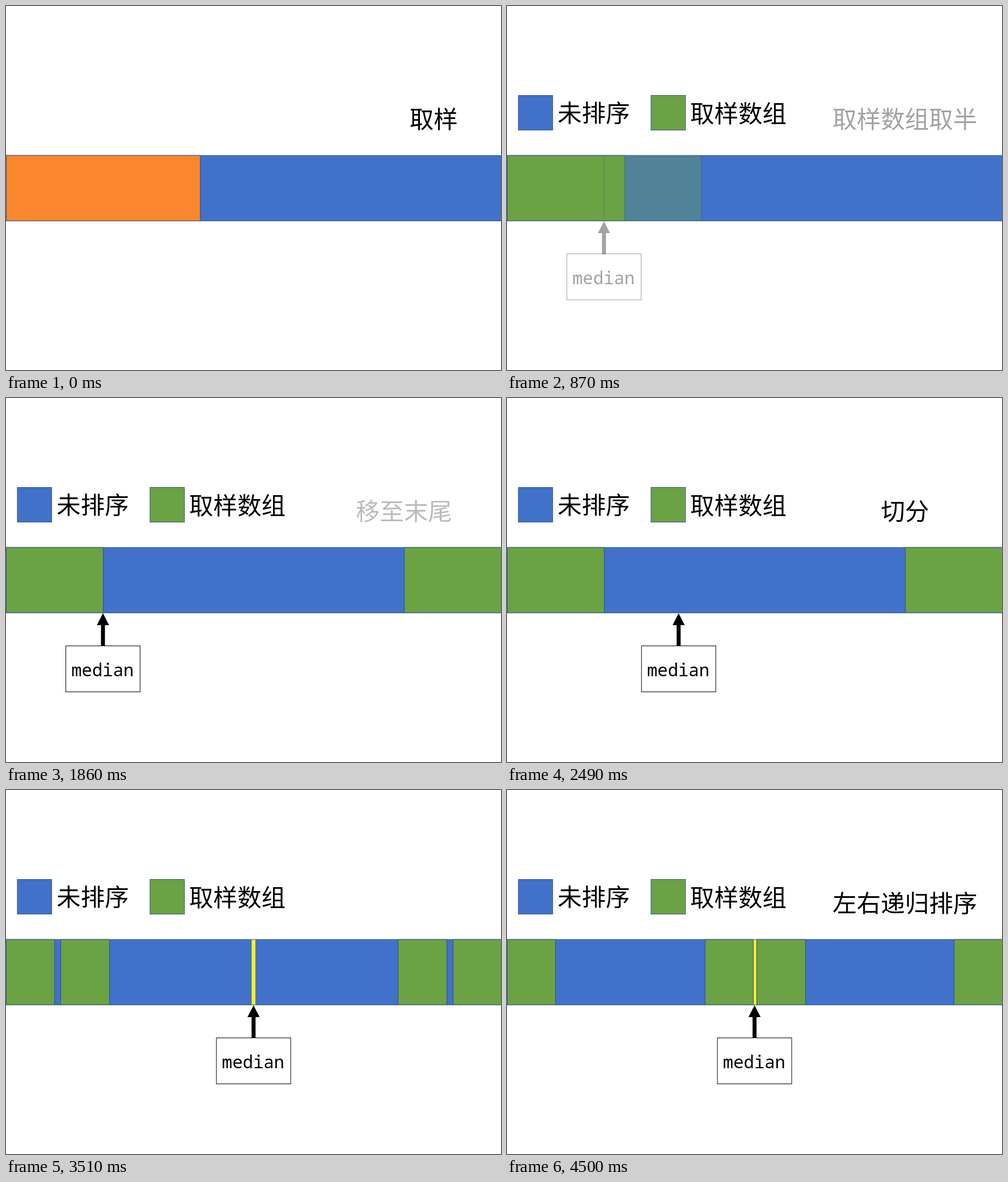
Animation, 873 px wide and 641 px high, one loop 4620 ms. Source, as an HTML page with a canvas:

```html
<!DOCTYPE html>
<html lang="zh-CN">
<head>
<meta charset="utf-8">
<style>
html, body { margin: 0; width: 873px; height: 641px; overflow: hidden; background: #fff; }
canvas { display: block; }
</style>
</head>
<body>
<canvas id="stage" width="873" height="641"></canvas>
<script>
const ctx = document.getElementById('stage').getContext('2d');
const LOOP = 4620, STEP = 30;
const STARTS = [30, 660, 1230, 1800, 2370, 2940, 3510, 4080];
const BLUE = '#4171c9', GREEN = '#6ba244', YELLOW = '#fff021', EDGE = '#2b538e';
const ORANGE_RGB = [250, 135, 45], GREEN_RGB = [107, 162, 68];

// text, centre x, transition that shows it, transition that hides it
const LABELS = [
  ['取样', 754.3, -1, 0],
  ['取样数组取半', 701.8, 1, 2],
  ['移至末尾', 701.8, 2, 3],
  ['切分', 702, 3, 5],
  ['移向枢轴', 701.8, 6, 7],
  ['左右递归排序', 701.8, 7, 8]
];

const clamp = v => Math.min(1, Math.max(0, v));
const mix = (a, b, p) => a + (b - a) * p;

// Steps elapsed since transition i began
let now = 0;
const steps = i => i < 0 ? 99 : i >= STARTS.length ? 0 : Math.max(0, (now - STARTS[i]) / STEP + 1);

function move(i) {
  const k = steps(i);
  if (!k) return 0;
  const v = 1 - (1 - clamp((k + 0.1) / 19)) ** 2.2;
  return v * v * (3 - 2 * v);
}
const fadeIn = i => 1 - (1 - clamp((steps(i) - 6) / 9)) ** 1.8;
const fadeOut = i => clamp(1 - steps(i) / 4.1);

function rect(x, y, w, h, fill, stroke) {
  ctx.fillStyle = fill;
  ctx.fillRect(x, y, w, h);
  ctx.strokeStyle = stroke;
  ctx.strokeRect(x, y, w, h);
}

function bar(x0, x1, fill, alpha = 1) {
  if (alpha <= 0) return;
  const a = Math.round(x0), b = Math.round(x1);
  ctx.globalAlpha = alpha;
  rect(a + 0.5, 263.2, b - a, 115.2, fill, EDGE);
  ctx.globalAlpha = 1;
}

function text(str, x, y, align) {
  ctx.font = '42.5px "Noto Sans CJK SC", "Noto Sans CJK", sans-serif';
  ctx.textAlign = align;
  ctx.fillStyle = '#000';
  ctx.fillText(str, x, y);
}

function legend() {
  ctx.globalAlpha = fadeIn(0);
  rect(20, 157.5, 60.6, 61, BLUE, EDGE);
  rect(254, 157.5, 60.8, 61, GREEN, EDGE);
  text('未排序', 89.3, 203.5, 'left');
  text('取样数组', 323, 204.5, 'left');
  ctx.globalAlpha = 1;
}

function bars() {
  bar(0, 874, BLUE);

  ctx.globalAlpha = fadeIn(4);
  ctx.fillStyle = YELLOW;
  ctx.fillRect(433.3, 263.7, 6.5, 114.2);
  ctx.globalAlpha = 1;

  // The sample changes colour, is halved, then halved again
  const tint = move(0), shrink = move(1), halve = move(5), meet = move(6);
  const rgb = ORANGE_RGB.map((c, i) => Math.round(mix(c, GREEN_RGB[i], tint)));
  const leftEnd = mix(mix(342, 171, shrink), 85.4, halve);

  const inner = mix(85.4, 348.7, meet);
  bar(inner, inner + 85.3, GREEN, fadeIn(5));
  bar(0, leftEnd, `rgb(${rgb})`);

  const right = mix(mix(171, 702, move(2)), 440, meet);
  bar(788, 873.5, GREEN, fadeIn(5));
  bar(right, right + mix(171, 85.7, halve), GREEN, fadeIn(1));
}

function median() {
  ctx.save();
  ctx.globalAlpha = fadeIn(1);
  ctx.translate(mix(0, 265.6, move(4)), 0);
  rect(105.5, 436.5, 131, 81, '#fff', '#000');
  ctx.fillStyle = '#000';
  ctx.beginPath();
  ctx.moveTo(171, 379);
  ctx.lineTo(181.7, 400);
  ctx.lineTo(160.3, 400);
  ctx.fill();
  ctx.fillRect(167.5, 400, 7, 37);
  ctx.font = '30.6px "Noto Sans Mono", monospace';
  ctx.textAlign = 'center';
  ctx.fillText('median', 170.3, 490);
  ctx.restore();
}

function labels() {
  for (const [str, x, shown, hidden] of LABELS) {
    ctx.globalAlpha = fadeIn(shown) * fadeOut(hidden);
    if (ctx.globalAlpha > 0) text(str, x, 214.8, 'center');
  }
  ctx.globalAlpha = 1;
}

function draw(time) {
  now = Math.floor((time % LOOP) / STEP) * STEP;
  ctx.fillStyle = '#fff';
  ctx.fillRect(0, 0, 873, 641);
  legend();
  bars();
  median();
  labels();
}

function frame() {
  draw(performance.now());
  requestAnimationFrame(frame);
}
frame();
</script>
</body>
</html>
```
